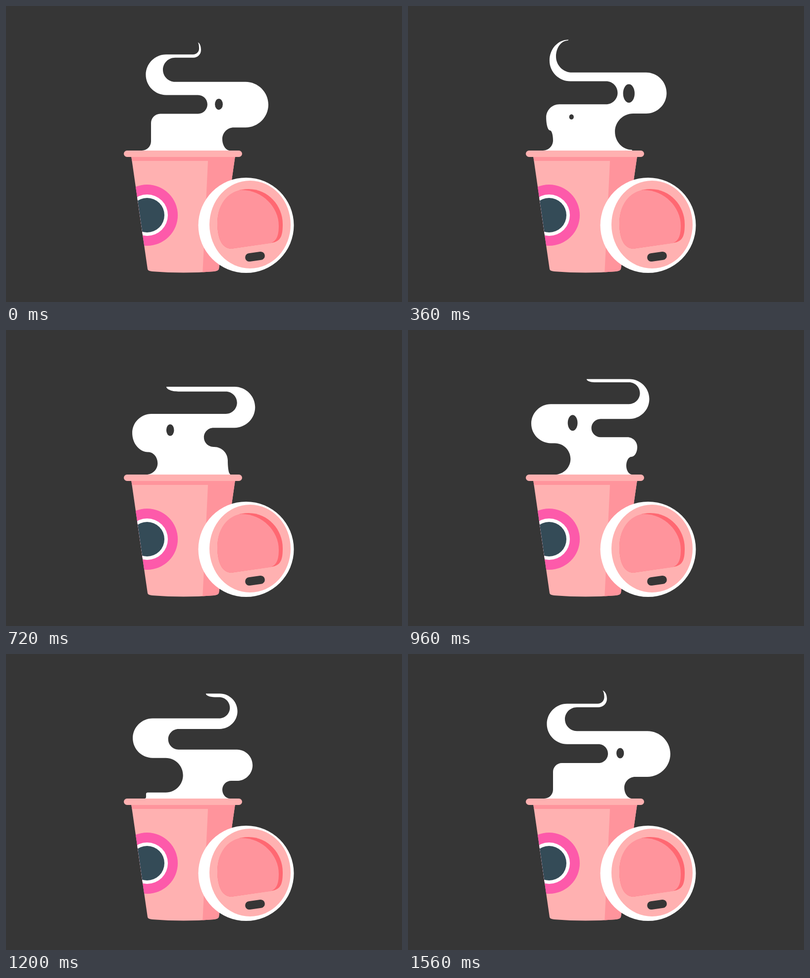
Recreate the animation shown at these times as an HTML page with a canvas. Size 800 px wide and 600 px high, loop 1590 ms.

```html
<!DOCTYPE html>
<html lang="en">
<head>
<meta charset="utf-8">
<title>Coffee steam</title>
<style>
html, body { margin: 0; width: 100%; height: 100%; overflow: hidden; background: #363636; }
canvas { display: block; }
</style>
</head>
<body>
<canvas id="stage" width="800" height="600"></canvas>
<script>
const ctx = document.getElementById('stage').getContext('2d');
const LOOP = 1590, STEP = 30, CUT = 720, KAPPA = 0.55, RIM = 293;
const DARK = '#363636', LIGHT = '#ffb1b1', ROSE = '#ff949c', RED = '#ff6872',
      PINK = '#fd5aaa', NAVY = '#344b57', WHITE = '#fff';

const mix = (a, b, s) => a + (b - a) * s;
const bump = (t, center, width) => Math.exp(-(((t - center) / width) ** 2));
const smooth = (from, to, t) => {
  const s = Math.min(1, Math.max(0, (t - from) / (to - from)));
  return s * s * (3 - 2 * s);
};
const clamp = (t, lo, hi) => Math.min(hi, Math.max(lo, t));

// A bend leaves the cup, rises steadily and ends in the tip several loops later.
// Each side of a bend has an extreme x and, above it, a flat lane at height y.
const leftOuter = {
  x: t => 271 + 22 * Math.cos(2 * Math.PI * clamp(t, 0, 1650) / 1900),
  lane: t => mix(RIM, 229.4 - 0.0825 * t - 11 * bump(t, 0, 200), smooth(-500, -240, t)),
  birth: [-600, -240], death: [2130, 2310]
};
const leftInner = {
  x: t => 437 - 120 * smooth(0, 1400, t) + 32 * bump(t, 840, 250) - 18 * smooth(1590, 1950, t),
  lane: t => mix(RIM, Math.min(257, 246 - 0.0903 * t + 21 * bump(t, 920, 450)), smooth(-900, -630, t)),
  birth: [-900, -500], death: [2130, 2310]
};
const rightInner = {
  x: t => 382 - 89 * Math.cos(Math.PI * (Math.max(t, 360) - 360) / 2040) - 27 * bump(t, 1950, 250),
  lane: t => Math.min(303.9 - 0.0776 * t,
    mix(leftOuter.lane(t), RIM, 0.5 + 0.13 * smooth(0, 720, t))),
  birth: [-600, -240], death: [2700, 3300]
};
const rightOuter = {
  x: t => 448 + 82 * smooth(740, 1540, t) - 85 * smooth(1600, 3500, t),
  lane: t => mix(RIM, 292.7 - 0.0773 * t - 16 * bump(t, 1590, 400), smooth(300, 720, t)),
  birth: [300, 720], death: [2700, 3300]
};

function tipAt(u) {
  const v = (u - CUT + 2 * LOOP) % LOOP;
  return {
    x: Math.max(324, 357 + 55 * Math.cos(2 * Math.PI * (v - 620) / LOOP)),
    y: 74 + 41 * bump(v, 0, 350) - 17 * smooth(980, 1530, v) + 58 * bump(v, LOOP, 100),
    taper: 2.5
  };
}

// Nodes of one outline from the rim up, alternating right and left bends.
function outline(baseX, rightBend, leftBend, u, tip) {
  const nodes = [{ x: baseX, y: RIM, lane: RIM }];
  for (let i = 0; i < 5; i++) {
    const bend = i % 2 ? leftBend : rightBend;
    const t = u + LOOP * Math.floor(i / 2);
    const lane = Math.max(tip.y, bend.lane(t));
    const grown = mix(baseX, bend.x(t), smooth(...bend.birth, t));
    nodes.push({
      x: mix(grown, tip.x, smooth(...bend.death, t)),
      y: (nodes[i].lane + lane) / 2,
      lane
    });
  }
  return nodes;
}

// From one bend to the next: quarter arc, flat lane, quarter arc.
function follow(a, b, y) {
  const dx = b.x - a.x, dir = Math.sign(dx), k = 1 - KAPPA;
  let ra = Math.abs(a.y - y) * (a.taper || 1), rb = Math.abs(b.y - y) * (b.taper || 1);
  const fit = dir * Math.min(1, Math.abs(dx) / (ra + rb || 1));
  ra *= fit;
  rb *= fit;
  ctx.bezierCurveTo(a.x, mix(a.y, y, KAPPA), a.x + ra * k, y, a.x + ra, y);
  ctx.lineTo(b.x - rb, y);
  ctx.bezierCurveTo(b.x - rb * k, y, b.x, mix(b.y, y, KAPPA), b.x, b.y);
}

function drawHole(time, birth, x, y, drift, size) {
  const age = (time - birth + LOOP) % LOOP;
  const scale = size * smooth(0, 60, age) * (1 - smooth(750, 950, age));
  ellipse(x + drift * age, y - 0.061 * age,
    scale * (4.5 + 0.0095 * age), scale * (4.5 + 0.0195 * age), DARK);
}

function drawSteam(time) {
  const u = time < CUT ? time : time - LOOP;
  const tip = tipAt(u);
  const baseLeft = 270 - 9 * Math.cos(2 * Math.PI * (u + 100) / LOOP), baseRight = 453;
  const left = outline(baseLeft, rightInner, leftOuter, u, tip);
  const right = outline(baseRight, rightOuter, leftInner, u, tip);

  ctx.fillStyle = WHITE;
  ctx.beginPath();
  ctx.moveTo(baseLeft, RIM + 5);
  ctx.lineTo(baseLeft, RIM);
  left.forEach((n, i) => follow(n, left[i + 1] || tip, n.lane));
  for (let i = right.length - 1; i >= 0; i--) follow(right[i + 1] || tip, right[i], right[i].lane);
  ctx.lineTo(baseRight, RIM + 5);
  ctx.fill();

  drawHole(time, 300, 330, 228.5, 0.004, 0.92);
  drawHole(time, 1290, 416.5, 217.5, 0.045, 1.08);
}

function ellipse(x, y, rx, ry, color) {
  ctx.fillStyle = color;
  ctx.beginPath();
  ctx.ellipse(x, y, rx, ry, 0, 0, 2 * Math.PI);
  ctx.fill();
}

function shape(d, color) {
  ctx.fillStyle = color;
  ctx.fill(new Path2D(d));
}

function pill(x, y, w, h, color) {
  ctx.fillStyle = color;
  ctx.beginPath();
  ctx.roundRect(x, y, w, h, h / 2);
  ctx.fill();
}

const cupBody = new Path2D('M253 304H463L430 533Q429 537 420 538Q360 543 295 538Q286 537 286 533Z');

function drawCup() {
  ctx.save();
  ctx.clip(cupBody);
  shape('M240 300H480V545H240Z', LIGHT);
  shape('M240 300H480V545H397L408 314H240Z', ROSE);
  ellipse(285, 424, 62, 62, PINK);
  ellipse(285, 424, 42, 42, WHITE);
  ellipse(285, 424, 35, 35, NAVY);
  ctx.restore();
  pill(238, 293, 239, 13, LIGHT);
}

function drawLid() {
  ellipse(485, 444.5, 96.5, 96.5, WHITE);
  ellipse(493, 443, 82, 89, LIGHT);
  shape('M455 492C432 491 427 462 427 440C427 400 452 371 490 371C530 371 559 405 559 442C559 462 557 477 537 480Z', RED);
  shape('M455 492C432 491 427 462 427 440C427 402 448 376 476 373C518 373 551 408 551 445C551 463 548 477 533 481Z', ROSE);
  ctx.save();
  ctx.translate(503, 508);
  ctx.rotate(-0.14);
  pill(-20, -8.5, 40, 17, DARK);
  ctx.restore();
}

function draw(now) {
  const time = Math.floor((now % LOOP) / STEP) * STEP;
  ctx.fillStyle = DARK;
  ctx.fillRect(0, 0, 800, 600);
  drawSteam(time);
  drawCup();
  drawLid();
}

const start = performance.now();
function tick() {
  draw(performance.now() - start);
  requestAnimationFrame(tick);
}
tick();
</script>
</body>
</html>
```
